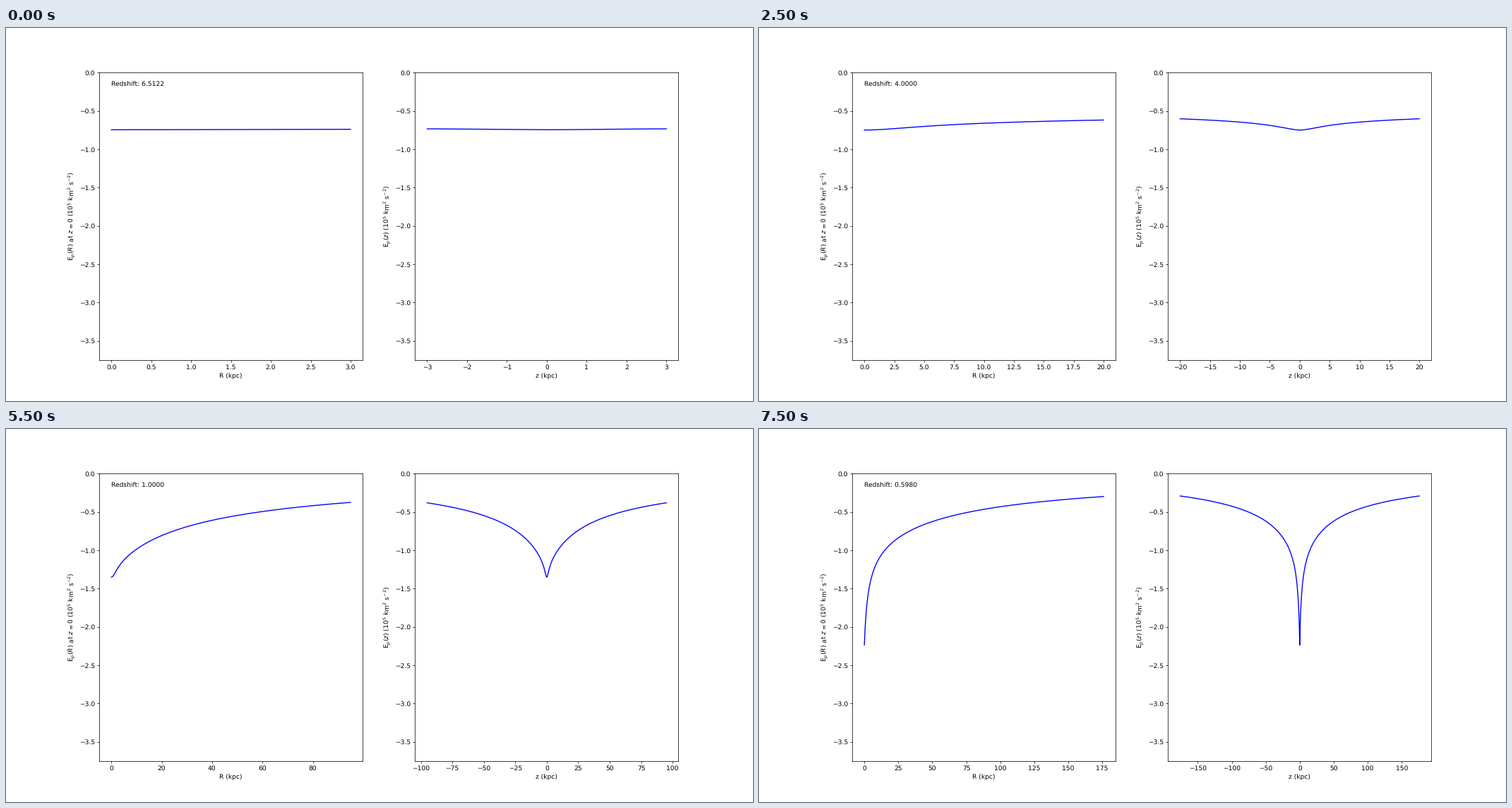
A matplotlib script that plays this animation: 1058 by 529 pixels, repeating every 8 s.

```python
import numpy as np
import matplotlib.pyplot as plt
from matplotlib.animation import FuncAnimation

plt.rcParams["font.family"] = "DejaVu Sans"
plt.rcParams["text.hinting"] = "none"

FRAMES, STEP = 16, 500
BULGE = 0.015              # bulge radius as a fraction of the extent
KEYS = [0, 3, 5, 7, 9, 12, 15]

# Depth at the centre and at the ends of both curves, and core radius
CENTRE = [0.744, 0.764, 0.748, 0.882, 0.985, 1.533, 2.236]
EDGE_R = [0.738, 0.693, 0.617, 0.552, 0.449, 0.336, 0.297]
EDGE_Z = [0.732, 0.694, 0.601, 0.539, 0.444, 0.347, 0.290]
CORE = [1.0, 0.8, 0.14, 0.19, 0.07, 0, 0]


def extent(i):
    """Radius of the plotted region in kpc."""
    return round(np.interp(i, [0, 3, 5, 7, 9, 10, 11, 12, 15],
                           [3, 8, 20, 39, 66, 83, 95, 150, 176]))


def redshift(i):
    if i == 0:
        return 6.5122
    if i < 12:
        return 6.5 - 0.5 * i
    return 0.8973 + (0.5980 - 0.8973) * (i - 12) / 3


def falloff(kernel, r):
    """Scale a kernel to run from 1 at the centre to 0 at the edge."""
    inner, outer = kernel(np.array([0.0, r.max()]))
    return (kernel(r) - outer) / (inner - outer)


def potential(i, q, edges, flatten):
    """Halo plus growing central bulge, with a core that shrinks away."""
    core = flatten * np.interp(i, KEYS, CORE)
    scale = np.interp(i, [9, 12], [0.27, 0.15])
    share = np.interp(i, [9, 12, 15], [1, 0.73, 0.40])

    def halo(r):
        x = np.maximum(r / scale, 1e-9)
        return np.log1p(x) / x

    def bulge(r):
        return BULGE / (r + BULGE)

    r = np.hypot(q, core) - core
    shape = share * falloff(halo, r) + (1 - share) * falloff(bulge, r)
    centre, edge = np.interp(i, KEYS, CENTRE), np.interp(i, KEYS, edges)
    return -(edge + (centre - edge) * shape)


fig, (ax_r, ax_z) = plt.subplots(1, 2, figsize=(16, 8), dpi=66.125)
fig.subplots_adjust(left=0.125, right=0.9, bottom=0.11, top=0.88, wspace=0.2)

for ax in (ax_r, ax_z):
    ax.set_ylim(-3.75, 0)
ax_r.set_xlabel("R (kpc)")
ax_r.set_ylabel(r"E$_p$($R$) at $z=0$ (10$^5$ km$^2$ s$^{-2}$)")
ax_z.set_xlabel("z (kpc)")
ax_z.set_ylabel(r"E$_p$($z$) (10$^5$ km$^2$ s$^{-2}$)")

line_r, = ax_r.plot([], [], color="blue", lw=1.5)
line_z, = ax_z.plot([], [], color="blue", lw=1.5)
label = ax_r.text(0, -0.17, "")

half = np.linspace(0, 1, 301)
full = np.linspace(-1, 1, 601)


def update(i):
    size = extent(i)
    line_r.set_data(half * size, potential(i, half, EDGE_R, 1))
    line_z.set_data(full * size, potential(i, np.abs(full), EDGE_Z, 0.6))
    ax_r.set_xlim(-0.05 * size, 1.05 * size)
    ax_z.set_xlim(-1.1 * size, 1.1 * size)
    label.set_text(f"Redshift: {redshift(i):.4f}")
    return line_r, line_z, label


anim = FuncAnimation(fig, update, frames=FRAMES, interval=STEP,
                     init_func=lambda: update(0), repeat=True, repeat_delay=0)
plt.show()
```
